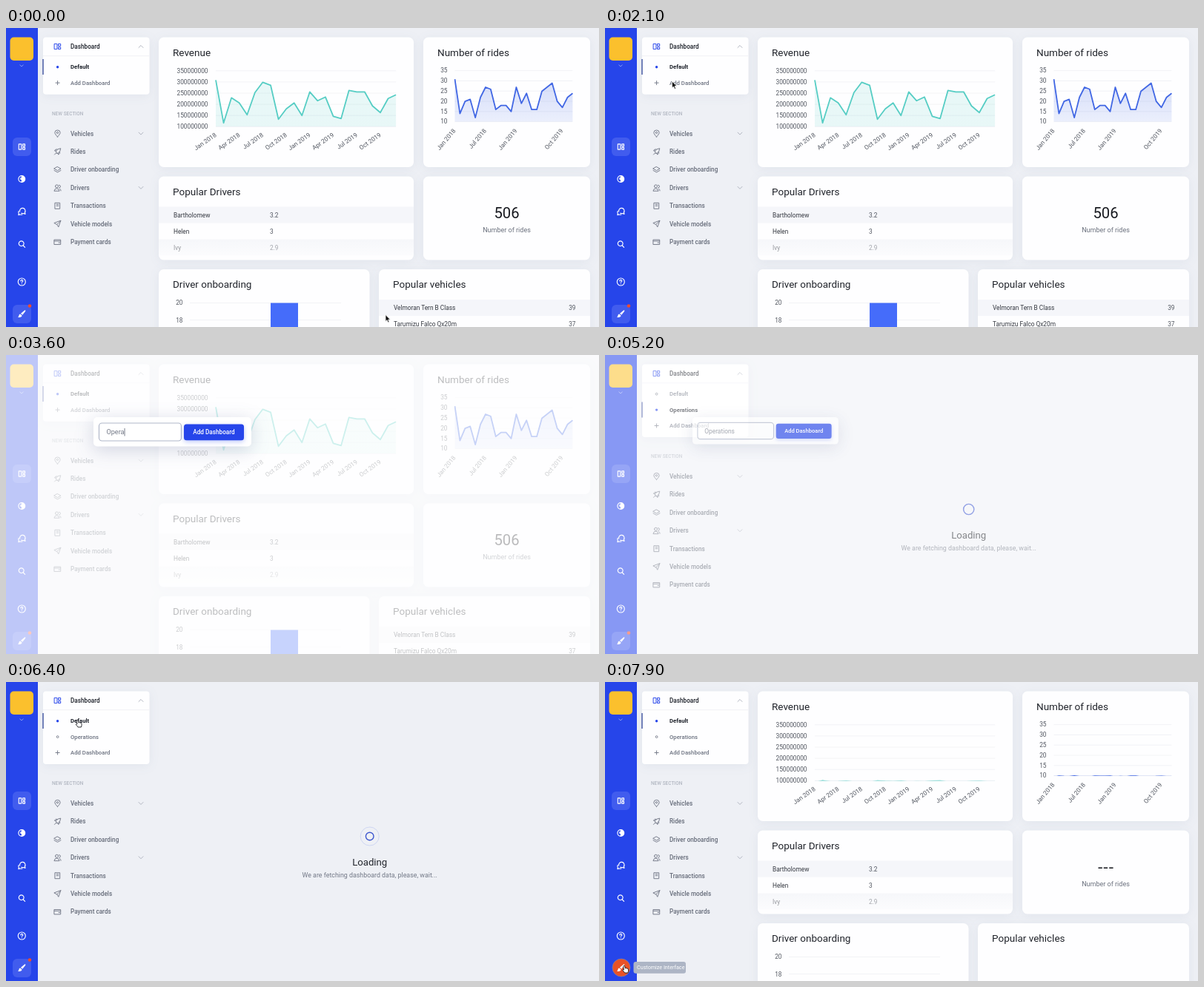
An HTML page for the animation above (8 s loop, 800x404 px).

```html
<!DOCTYPE html>
<html lang="en">
<head>
<meta charset="utf-8">
<title>Dashboard</title>
<style>
html, body { margin: 0; width: 100%; height: 100%; overflow: hidden; background: #eef0f5; }
svg { display: block; width: 100vw; height: 100vh; font-family: Roboto, "Open Sans", sans-serif; }
.card { fill: #fefeff; filter: drop-shadow(0 2px 7px rgba(60, 80, 130, .07)); }
.icon { fill: none; stroke: #737987; stroke-width: .95; stroke-linecap: round; stroke-linejoin: round; }
.side { stroke: #fff; stroke-width: 1.15; }
.title { font-size: 13.5px; fill: #22252c; }
.label { font-size: 8.3px; fill: #50555f; }
.cell { font-size: 8.3px; fill: #33373f; }
.menu { font-size: 8.2px; font-weight: 500; fill: #656b79; }
.sub { font-size: 7.75px; font-weight: 500; fill: #6c7280; }
.active { fill: #1c2029; font-weight: 700; }
.grid { stroke: #eff0f4; stroke-width: .8; }
</style>
</head>
<body>
<svg id="stage" viewBox="0 0 800 404" preserveAspectRatio="none"></svg>
<script>
const LOOP = 8000;
const BLUE = '#2645ea';

const text = (x, y, value, cls = 'label', extra = '') =>
  `<text x="${x}" y="${y}" class="${cls}" ${extra}>${value}</text>`;
const rect = (x, y, w, h, r = 0, extra = '') =>
  `<rect x="${x}" y="${y}" width="${w}" height="${h}" rx="${r}" ${extra}/>`;
const icon = (x, y, d, cls = 'icon', extra = '') =>
  `<path transform="translate(${x} ${y})" d="${d}" class="${cls}" ${extra}/>`;
const card = (x, y, w, h, title) =>
  rect(x, y, w, h, 7, 'class="card"') + (title ? text(x + 19, y + 25, title, 'title') : '');
const fade = (id, color, top, bottom) =>
  `<linearGradient id="${id}" x1="0" y1="0" x2="0" y2="1">
    <stop offset="0" stop-color="${color}" stop-opacity="${top}"/>
    <stop offset="1" stop-color="${color}" stop-opacity="${bottom}"/></linearGradient>`;
const range = n => [...Array(n).keys()];
const END = 'text-anchor="end"', MID = 'text-anchor="middle"';

const shapes = {
  board: 'M-4-3.6H-.6V3.6H-4ZM1.4-3.6H4.2V-.7H1.4ZM1.4 1H4.2V3.6H1.4Z',
  pin: 'M0 4.5C-2 2-3.6.5-3.6-1.3A3.6 3.3 0 0 1 3.6-1.3C3.6.5 2 2 0 4.5ZM-1.2-1.2A1.2 1.2 0 1 0 1.2-1.2A1.2 1.2 0 1 0-1.2-1.2',
  rocket: 'M-1.5 2L-2-1Q0-4 4.3-4.3Q4 0 1 2ZM-2-1H-4L-2.5-3H-.5M1 2V4L3 2.5V.5M-2 2L-4 4',
  layers: 'M0-3.8L4.5-1.3L0 1.2L-4.5-1.3ZM-4.5 1L0 3.5L4.5 1',
  people: 'M-3-2A2 2 0 1 0 1-2A2 2 0 1 0-3-2M-4.5 4Q-4 1-1 1Q2 1 2.5 4ZM2-3.6A1.8 1.8 0 0 1 2.3 0M3 1.3Q4.6 2 4.6 4',
  sheet: 'M-3.2-4H3.2V4H-3.2ZM-1.4-2H1.4M-1.4 0H1.4',
  plane: 'M4.3-4.2L1.3 4.2L-.7.8L-4.3-1ZM-.7.8L4.3-4.2',
  cardIcon: 'M-4.2-3H4.2V3.4H-4.2ZM-4.2-1.2H4.2M1.6 1H3',
  plus: 'M-2.6 0H2.6M0-2.6V2.6',
  up: 'M-3 1.5L0-1.5L3 1.5',
  down: 'M-3-1.5L0 1.5L3-1.5',
  chat: 'M-2.6-.2A3.7 3.7 0 1 1 4.1 1.1L4.7 3.4L2.3 2.5Q.7 2.8-.7 2.2M-4-.6Q-5 1.2-4 2.6L-4.4 4.6L-2.2 4Q-.6 4.4.6 4',
  search: 'M-4-.7A3.4 3.4 0 1 0 2.8-.7A3.4 3.4 0 1 0-4-.7M2 2L4.3 4.3',
  help: 'M-5 0A5 5 0 1 0 5 0A5 5 0 1 0-5 0M-1.5-1.2Q-1.3-2.6 0-2.6Q1.6-2.5 1.5-1.1Q1.3-.2 0 .6M0 2.5V2.6'
};

// Charts hold point heights above their baseline.
const revenue = {
  id: 'rev', x: 283, base: 133.3, step: 10.57, color: '#56cdc4', top: .13, bottom: .13,
  heights: [63, 5, 39, 32, 16, 46, 60, 56, 10, 24, 32, 15, 47, 35, 40, 14, 11, 49, 47, 47, 28, 19, 38, 43]
};
const rides = {
  id: 'rides', x: 605.5, base: 126.6, step: 6.91, color: '#4167e4', top: .22, bottom: .1,
  heights: [31, 14, 20, 21, 12, 22, 27, 26, 16, 18, 18, 15, 27, 19, 24, 16, 16, 25, 27, 29, 20, 17, 22, 24]
    .map(v => (v - 10) * 2.74)
};

function chart(c) {
  const width = c.step * 23;
  return `<defs>${fade(c.id + 'Fill', c.color, c.top, c.bottom)}
    <clipPath id="${c.id}Clip">${rect(c.x - 1, c.base - 80, width + 2, 80.3)}</clipPath></defs>
    <g clip-path="url(#${c.id}Clip)"><path id="${c.id}Area" fill="url(#${c.id}Fill)"/>
    <path id="${c.id}Line" fill="none" stroke="${c.color}" stroke-width="1.8" stroke-linejoin="round"/></g>`;
}

function axes(c, gap, labelX, values, ticks, angle) {
  const rows = values.map((v, i) => {
    const y = c.base - i * gap;
    return `<path class="grid" d="M${c.x} ${y}H${c.x + c.step * 23}"/>` + text(labelX, y + 2.8, v, 'label', END);
  });
  const names = ticks.map(([i, name]) =>
    text(0, 0, name, 'label', `${END} transform="translate(${c.x + i * c.step + 1.5} ${c.base + 12.5}) rotate(${angle})"`));
  return rows.join('') + names.join('');
}

const quarters = range(8).map(i => [i * 3, ['Jan', 'Apr', 'Jul', 'Oct'][i % 4] + ' ' + (2018 + (i >> 2))]);

function dashboard() {
  const drivers = [['Bartholomew', '3.2'], ['Helen', '3'], ['Ivy', '2.9']].map(([name, score], i) =>
    `<g opacity="${i === 2 ? .5 : 1}">` + text(226, 256 + i * 21.9, name, 'cell') + text(356, 256 + i * 21.9, score) + '</g>');
  return `<g id="dash"><defs>${fade('rowFade', '#eef0f5', .5, .15)}</defs>
    ${card(206, 12.5, 344, 175.5, 'Revenue')}${card(563, 12.5, 225, 175.5, 'Number of rides')}
    ${card(206, 200.5, 344, 113, 'Popular Drivers')}${card(563, 200.5, 225, 113)}
    ${card(206, 326, 284.5, 100, 'Driver onboarding')}${card(503, 326, 285, 100, 'Popular vehicles')}
    <g id="axes">
      ${axes(revenue, 15.1, 272.5, range(6).map(i => (i + 2) * 5e7), quarters, -35)}
      ${axes(rides, 13.8, 595.5, range(6).map(i => 10 + i * 5), [[0, 'Jan 2018'], [6, 'Jul 2018'], [12, 'Jan 2019'], [21, 'Oct 2019']], -50)}
      <path class="grid" d="M248 371.5H452M248 394.5H452"/>
      ${text(238.5, 374.3, 20, 'label', END)}${text(238.5, 397.5, 18, 'label', END)}
    </g>
    ${chart(revenue)}${chart(rides)}
    <g id="drivers">${rect(206, 241.5, 344, 22, 0, 'fill="#f5f6fa"')}
      ${rect(206, 285.5, 344, 22, 0, 'fill="url(#rowFade)"')}${drivers.join('')}</g>
    <text id="count" x="675.5" y="257.3" font-size="20.2" fill="#17191f" ${MID}></text>
    ${text(675.5, 275.7, 'Number of rides', 'label', MID + ' style="font-size:9px;fill:#6a707d"')}
    <g id="lists">
      ${rect(357, 371.5, 37, 40, 0, 'fill="#456cfa"')}
      ${rect(503, 367, 285, 22, 0, 'fill="#f5f6fa"')}
      ${text(523, 381, 'Velmoran Tern B Class', 'cell')}${text(768.5, 381, 39, 'label', END)}
      ${text(523, 402.8, 'Tarumizu Falco Qx20m', 'cell')}${text(768.5, 402.8, 37, 'label', END)}
    </g></g>`;
}

function menu() {
  const items = [['pin', 'Vehicles', 1], ['rocket', 'Rides'], ['layers', 'Driver onboarding'], ['people', 'Drivers', 1],
    ['sheet', 'Transactions'], ['plane', 'Vehicle models'], ['cardIcon', 'Payment cards']];
  const rows = items.map(([shape, name, more], i) => {
    const y = 142.6 + i * 24.42;
    return icon(69.5, y, shapes[shape]) + text(87, y + 2.9, name, 'menu') +
      (more ? icon(182, y, shapes.down, 'icon', 'style="stroke:#aeb3be"') : '');
  });
  return `<rect id="menuCard" x="50" y="12.5" width="143.5" rx="4" class="card"/>
    <path d="M50 37.8H193.5" stroke="#f0f1f5"/>
    ${icon(69.5, 25, shapes.board, 'icon', `style="stroke:${BLUE}"`)}
    ${text(87, 27.9, 'Dashboard', 'menu active', 'style="font-weight:500"')}
    ${icon(182, 25, shapes.up, 'icon', 'style="stroke:#aeb3be"')}
    <rect id="marker" x="49.3" width="1.4" height="21" fill="#3d519f"/>
    <circle id="dotDefault" cx="69.6" cy="52.7"/><text id="default" x="87" y="55.4">Default</text>
    <g id="operations"><circle id="dotOps" cx="69.6" cy="74.1"/><text id="ops" x="87" y="76.8">Operations</text></g>
    <g id="addItem">${icon(69.6, 74.1, shapes.plus)}${text(87, 76.8, 'Add Dashboard', 'sub')}</g>
    <g id="section">${text(62, 118, 'NEW SECTION', 'label', 'style="font-size:6.5px;font-weight:500;fill:#b1b6c1"')}${rows.join('')}</g>`;
}

function sidebar() {
  const side = (y, shape) => icon(21.3, y, shapes[shape], 'icon side');
  return `${rect(0, 0, 43, 404, 0, `fill="${BLUE}"`)}
    ${rect(5.5, 12.5, 31.5, 31.5, 5, 'fill="#fbc02d"')}
    ${icon(21, 51, 'M-2.2-1L0 1L2.2-1', 'icon', 'style="stroke:#8c9cf5"')}
    ${rect(9, 148, 25, 25, 6, 'fill="#415cee"')}${side(160.5, 'board')}
    <circle cx="21.3" cy="204" r="4.4" class="icon side"/>
    <path transform="translate(21.3 204)" d="M-1-4.2Q3-4.7 4.3-1V2Q2 5-1 4L0 2L-2 .5V-1.5L0-2.5Z" fill="#fff"/>
    ${side(248, 'chat')}${side(292, 'search')}${side(343, 'help')}
    <rect id="brushTile" x="9" y="374" width="25" height="25" rx="6" fill="#415cee"/>
    <circle id="brushHover" cx="22" cy="386" r="12" fill="#e95227" stroke="#7c7fa8" stroke-width=".8"/>
    <path transform="translate(21 386.5)" d="M5-5.2Q5.8-4.5 5-3.5L1.2 1.3L-1-.8L4-5Q4.5-5.5 5-5.2ZM-1.7 0L.5 2Q.4 5-5 4.3Q-3.6 3.5-3.6 2Q-3.4.2-1.7 0Z" fill="#fff"/>
    <circle id="badge" cx="32" cy="375.5" r="2.3" fill="#ee4b2e"/>
    <g id="tip">${rect(38.5, 378, 70.5, 15.7, 3, 'fill="#adb5c5"')}
      ${text(43, 388.3, 'Customize Interface', 'label', 'style="font-size:7.2px;fill:#fff"')}</g>`;
}

const loading = `<g id="loading">
  <circle id="ripple" cx="490.7" cy="208.5" fill="none" stroke="#6f86e8" stroke-width="1"/>
  <circle id="ring" cx="490.7" cy="208.5" fill="none" stroke="#3d57cf" stroke-width="1.4"/>
  ${text(490.7, 247.5, 'Loading', 'title', MID + ' style="font-size:13.2px"')}
  ${text(490.7, 264.3, 'We are fetching dashboard data, please, wait...', 'label', MID + ' style="font-size:8.85px;fill:#737987"')}</g>`;

const dialog = `<rect id="veil" width="800" height="404" fill="#fff"/>
  <g id="dialog">
    ${rect(0, 0, 213, 39.5, 5, 'fill="#fff" style="filter:drop-shadow(0 5px 12px rgba(50,65,120,.2))"')}
    ${rect(7.5, 8, 111, 24, 4, 'fill="#fff" stroke="#b0b7c9" stroke-width="1.2"')}
    <text id="typed" x="17.5" y="23.3" font-size="9.1" fill="#737987"></text>
    <path id="caret" stroke="#555b6a" stroke-width=".8"/>
    <rect id="button" x="122" y="9.5" width="81" height="21.8" rx="3.5" fill="${BLUE}" style="filter:drop-shadow(0 2px 3px rgba(38,69,234,.3))"/>
    <text id="buttonText" x="162.5" y="23.2" font-size="8.2" font-weight="500" ${MID}>Add Dashboard</text>
  </g>`;

const cursors = `<path id="arrow" d="M0 0V9L2 7.1L3.5 10.4L5 9.7L3.6 6.6H6.4Z" fill="#111" stroke="#fff" stroke-width=".7"/>
  <path id="hand" d="M0 0Q1-.8 1.6.3L2.2 3.2Q3.2 2.5 3.8 3.4Q4.7 2.9 5.2 3.8Q6.4 3.5 6.5 4.8Q7 7.5 5.8 9.5H1.6Q.4 7.6-1.2 6Q-1 4.7.5 5.4L-.4 1Z" fill="#fff" stroke="#16181d" stroke-width=".9" stroke-linejoin="round"/>`;

const stage = document.getElementById('stage');
stage.innerHTML = rect(0, 0, 800, 404, 0, 'fill="#eef0f5"') + dashboard() + loading + menu() + sidebar() + dialog + cursors;

const el = {};
stage.querySelectorAll('[id]').forEach(node => { el[node.id] = node; });
const set = (id, attrs) => Object.entries(attrs).forEach(([k, v]) => el[id].setAttribute(k, v));
const show = (id, on) => { el[id].style.display = on ? '' : 'none'; };
const progress = (t, from, to) => Math.min(1, Math.max(0, (t - from) / (to - from)));
const easeOut = p => 1 - (1 - p) ** 2;
const smooth = p => p * p * (3 - 2 * p);

const track = [[400, 512, 387.5], [1900, 90.5, 72], [5350, 90.5, 72], [5900, 95.5, 51.5], [6900, 95.5, 51.5], [7650, 25, 383.5]];
function pointer(t) {
  const i = track.findIndex(k => k[0] > t);
  if (i <= 0) return (i ? track[track.length - 1] : track[0]).slice(1);
  const [a, b] = [track[i - 1], track[i]];
  const p = smooth(progress(t, a[0], b[0]));
  return [a[1] + (b[1] - a[1]) * p, a[2] + (b[2] - a[2]) * p];
}

function drawChart(c, grow) {
  const points = c.heights.map((h, i) => `${(c.x + i * c.step).toFixed(2)} ${(c.base - h * grow).toFixed(2)}`).join('L');
  set(c.id + 'Line', { d: 'M' + points });
  set(c.id + 'Area', { d: `M${points}L${c.x + 23 * c.step} ${c.base}H${c.x}Z` });
}

function menuEntry(id, dot, active) {
  set(id, { class: active ? 'sub active' : 'sub' });
  set(dot, active
    ? { r: 1.7, fill: BLUE, stroke: 'none' }
    : { r: 1.4, fill: 'none', stroke: '#737987', 'stroke-width': .9 });
}

function updateDashboard(t, ready, shown) {
  show('dash', shown);
  show('axes', ready || t >= 7100);
  show('drivers', ready || t >= 7300);
  show('lists', ready);
  el.count.textContent = ready ? '506' : '---';
  el.count.style.fontFamily = ready ? '' : '"DejaVu Sans", sans-serif';
  // The lines rise from just below the clipped baseline.
  const grow = ready ? 1 : t >= 7850 ? -.04 : -1;
  drawChart(revenue, grow);
  drawChart(rides, grow);

  show('loading', !shown);
  const beat = (t - 5200 + LOOP) % 800 / 800;
  set('ring', { r: 6.2 + .9 * Math.cos(beat * 2 * Math.PI) });
  set('ripple', { r: 7 + 11 * beat, opacity: .5 * (1 - beat) });
}

function updateMenu(t, added) {
  const onOps = added && t < 6300;
  const shift = added ? 21.4 : 0;
  set('menuCard', { height: 77.2 + shift });
  set('addItem', { transform: `translate(0 ${shift})` });
  set('section', { transform: `translate(0 ${shift})` });
  set('marker', { y: onOps ? 63.5 : 42 });
  show('operations', added);
  menuEntry('default', 'dotDefault', !onOps);
  menuEntry('ops', 'dotOps', onOps);

  const hover = t >= 7600;
  show('brushTile', !hover);
  show('badge', !hover);
  show('brushHover', hover);
  show('tip', t >= 7700);
}

function updateDialog(t) {
  const opening = easeOut(progress(t, 2200, 2400));
  const open = opening - progress(t, 5100, 5300);
  const veil = opening - progress(t, 5100, 5380);
  show('veil', veil > 0);
  show('dialog', open > 0);
  set('veil', { opacity: .7 * veil });
  set('dialog', { transform: `translate(118 84) scale(${.85 + .15 * open})`, opacity: Math.min(1, open * 1.3) });
  const letters = t < 2900 ? 0 : Math.floor((t - 2900) / 160) + 1;
  el.typed.textContent = 'Operations'.slice(0, letters);
  if (open > 0) {
    const x = 18 + (letters ? el.typed.getComputedTextLength() : 0);
    set('caret', { d: `M${x} 15V25.5` });
  }
  show('caret', t < 5000);
  const enabled = progress(t, 2900, 3100);
  set('button', { opacity: enabled });
  set('buttonText', { fill: enabled > .4 ? '#fff' : '#8497d6' });
}

function updateCursor(t) {
  const [x, y] = pointer(t);
  const typing = t >= 2850 && t < 5350;
  const hand = (t >= 5500 && t < 6980) || t >= 7580;
  show('arrow', !typing && !hand);
  show('hand', hand);
  set('arrow', { transform: `translate(${x} ${y})` });
  set('hand', { transform: `translate(${x} ${y})` });
}

function update(t) {
  const added = t >= 5100;
  updateDashboard(t, !added, !added || t >= 6800);
  updateMenu(t, added);
  updateDialog(t);
  updateCursor(t);
}

const start = performance.now();
function frame() {
  update(Math.max(0, performance.now() - start) % LOOP);
  requestAnimationFrame(frame);
}
frame();
</script>
</body>
</html>
```
